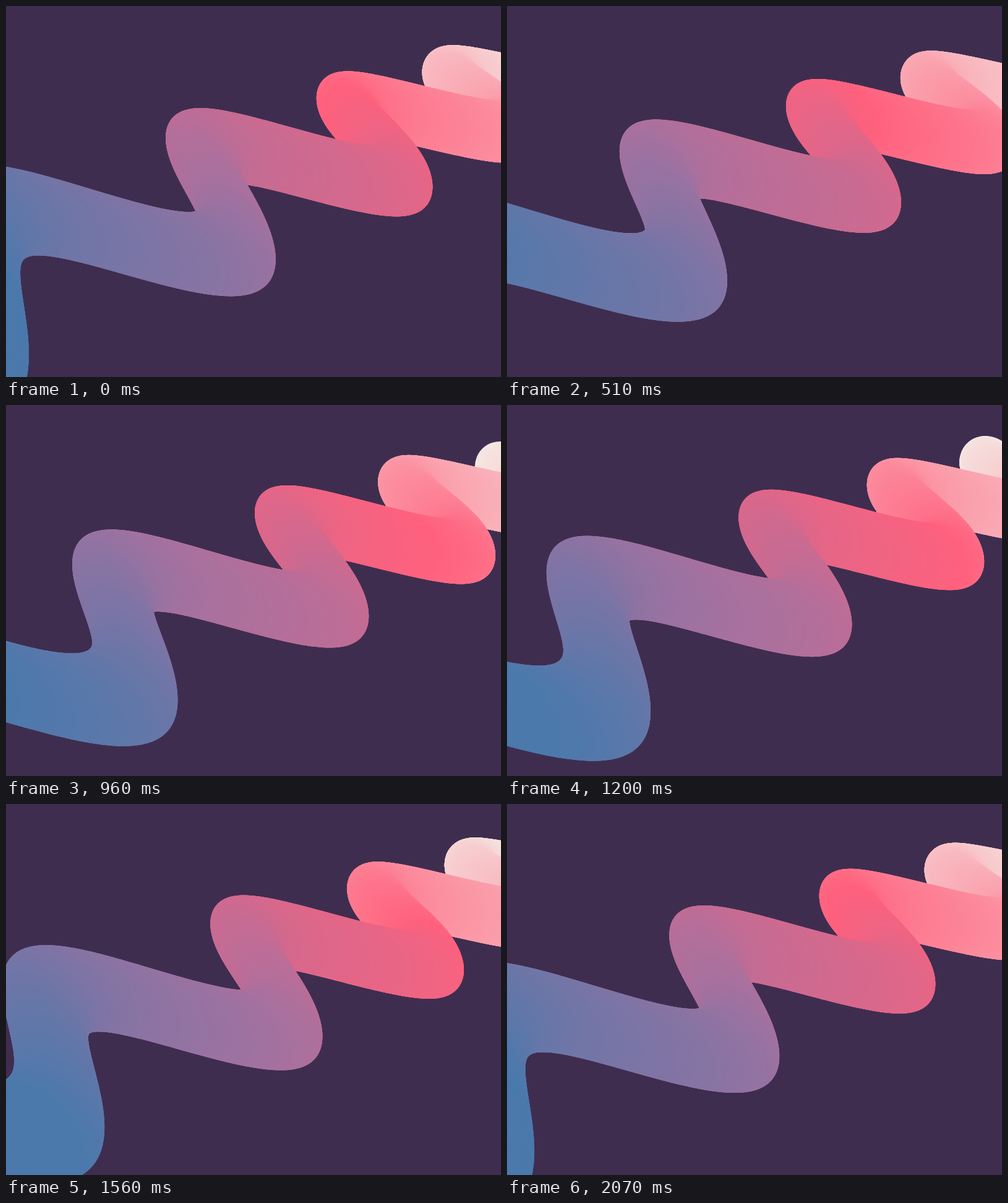
Animation of 800x600 px, one loop 2.1 s. Source, as an HTML page with a canvas:

```html
<!DOCTYPE html>
<html lang="en">
<head>
<meta charset="utf-8">
<title>Ribbon</title>
<style>
  html, body { margin: 0; width: 100%; height: 100%; overflow: hidden; background: #3f2d50; }
  canvas { display: block; width: 800px; height: 600px; }
</style>
</head>
<body>
<canvas id="stage" width="800" height="600"></canvas>
<script>
const ctx = document.getElementById('stage').getContext('2d');
const LOOP = 2100, TICK = 30;
const START = -0.405, END = 4.2, STEP = 0.004;
const TILT = 47 * Math.PI / 180;

// Key colours along the ribbon
const KEYS = [
  { at: START, rgb: [245, 230, 226] },
  { at: 1.15, rgb: [255, 97, 125] },
  { at: 2.33, rgb: [167, 113, 159] },
  { at: 3.25, rgb: [75, 121, 172] }
];

function colourAt(s) {
  const i = Math.max(1, KEYS.findIndex(key => key.at > s));
  const last = s >= KEYS[KEYS.length - 1].at;
  const from = last ? KEYS[KEYS.length - 1] : KEYS[i - 1];
  const to = last ? from : KEYS[i];
  const k = last ? 0 : (s - from.at) / (to.at - from.at);
  return `rgb(${from.rgb.map((c, n) => Math.round(c + (to.rgb[n] - c) * k))})`;
}

// Each slice keeps its place, size and colour, and swings about its centre.
// "near" grows like perspective as the ribbon approaches the viewer.
function makeSlice(s) {
  const near = 1 / (6.74 - s);
  return {
    s,
    x: 1710.5 - 6125 * near,
    y: -188.8 + 2223 * near,
    swingX: 78 + 5 * s,
    swingY: -26 + 370 * near,
    long: 350 * near,
    short: 44,
    fill: colourAt(s)
  };
}

const slices = [];
for (let s = START; s < END; s += STEP) slices.push(makeSlice(s));

function draw(phase) {
  ctx.fillStyle = '#3f2d50';
  ctx.fillRect(0, 0, 800, 600);
  for (const d of slices) {
    const swing = Math.cos(2 * Math.PI * (d.s - phase));
    ctx.fillStyle = d.fill;
    ctx.beginPath();
    ctx.ellipse(d.x - d.swingX * swing, d.y - d.swingY * swing,
      d.long, d.short, TILT, 0, 2 * Math.PI);
    ctx.fill();
  }
}

let shown = -1;
function frame() {
  const tick = Math.floor(performance.now() % LOOP / TICK);
  if (tick !== shown) draw(tick * TICK / LOOP);
  shown = tick;
  requestAnimationFrame(frame);
}
frame();
</script>
</body>
</html>
```
